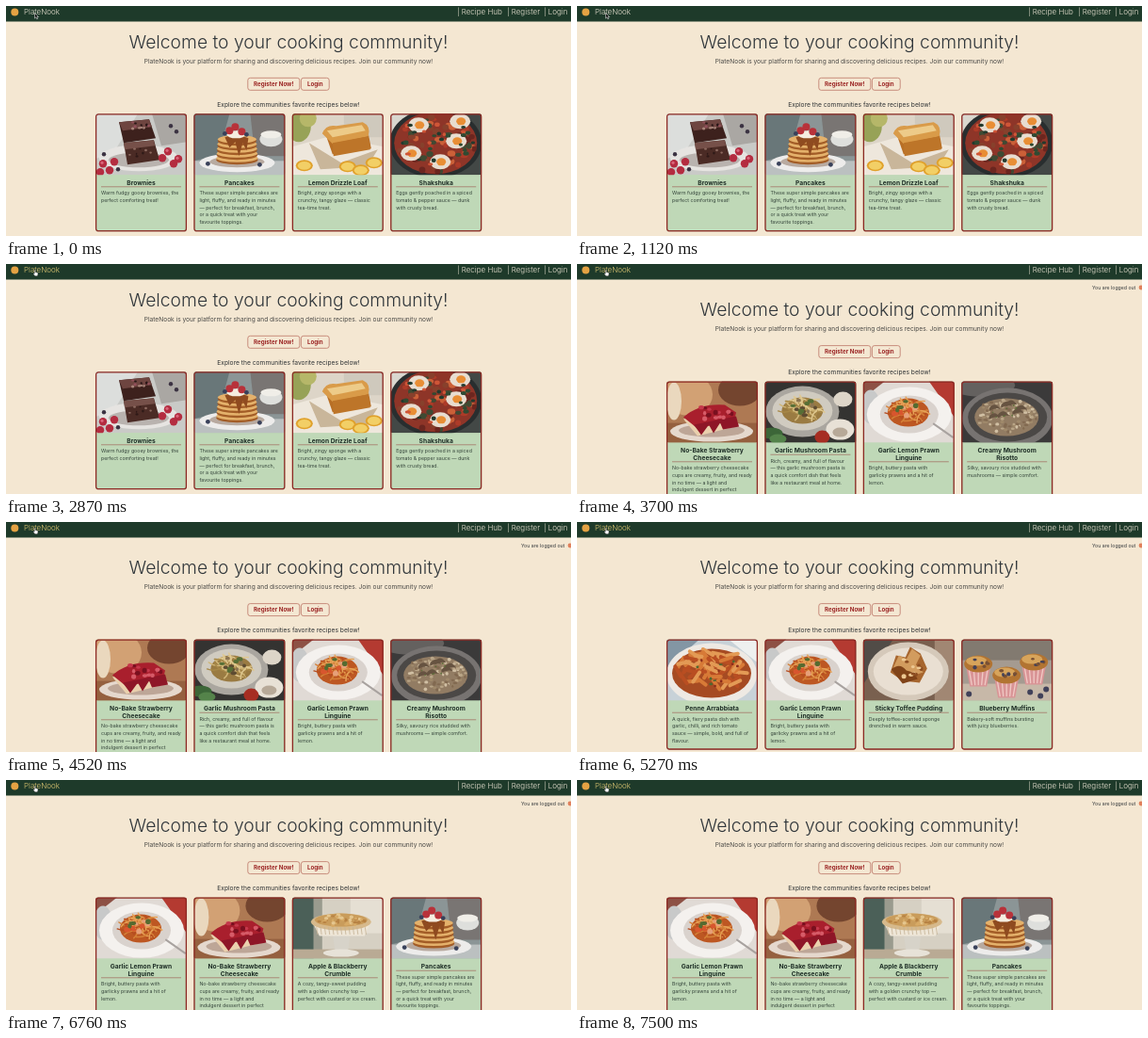
Animation of 600 by 244 pixels, one loop 7520 ms. Source, as an HTML page:

```html
<!DOCTYPE html>
<html lang="en">
<head>
<meta charset="utf-8">
<title>Cooking community</title>
<style>
  html, body { margin: 0; width: 100%; height: 100%; overflow: hidden; background: #f4e7d2; }
  svg { display: block; width: 600px; height: 244px; font-family: Inter, "Open Sans", sans-serif; }
</style>
</head>
<body>
<svg id="stage" viewBox="0 0 600 244"></svg>
<script>
const LOOP = 7520, HOVER = 2400, RELOADS = [0, 3450, 5030, 6560];
const BRAND = "PlateNook";

let seed = 1;
const rnd = (a, b) => {
  seed = (seed * 16807) % 2147483647;
  return a + (b - a) * seed / 2147483647;
};
const n = v => +v.toFixed(1);

// Shape helpers
const box = (x, y, w, h, fill, more = "") => `<rect x="${x}" y="${y}" width="${w}" height="${h}" fill="${fill}" ${more}/>`;
const oval = (x, y, rx, ry, fill) => `<ellipse cx="${n(x)}" cy="${n(y)}" rx="${n(rx)}" ry="${n(ry)}" fill="${fill}"/>`;
const path = (d, fill) => `<path d="${d}" fill="${fill}"/>`;
const line = (d, stroke, w) => `<path d="${d}" fill="none" stroke="${stroke}" stroke-width="${w}" stroke-linecap="round"/>`;
const text = (x, y, size, str, fill = "#33373a", more = "") =>
  `<text x="${x}" y="${y}" font-size="${size}" fill="${fill}" ${more}>${str}</text>`;
const MID = 'text-anchor="middle"', BOLD = 'font-weight="700"', THIN = 'font-weight="300"';

const repeat = (count, make) => Array.from({ length: count }, (_, i) => make(i)).join("");
const dots = (spots, r, fill) => spots.map(([x, y]) => oval(x, y, r, r, fill)).join("");

// Random point inside an ellipse
function inside(x, y, rx, ry) {
  const a = rnd(0, 6.283), d = Math.sqrt(rnd(0, 1));
  return [x + rx * d * Math.cos(a), y + ry * d * Math.sin(a)];
}
const scatter = (count, x, y, rx, ry, r, colors) => repeat(count, i => {
  const [px, py] = inside(x, y, rx, ry);
  return oval(px, py, r * rnd(.7, 1.4), r * rnd(.6, 1.1), colors[i % colors.length]);
});
const noodles = (count, x, y, rx, ry, len, w, colors) => repeat(count, i => {
  const [px, py] = inside(x, y, rx, ry), a = rnd(0, 6.283);
  const dx = len * Math.cos(a), dy = len * Math.sin(a) * .7;
  return line(`M${n(px - dx)} ${n(py - dy)}q${n(dx - dy * .6)} ${n(dy + dx * .5)} ${n(dx * 2)} ${n(dy * 2)}`, colors[i % colors.length], w);
});

// Each photo is a simplified scene, 97 by 65
const photos = {
  brownies: () => box(0, 0, 97, 65, "#c9cac7") + path("M0 0H45L20 40 0 48Z", "#dcdedc") + path("M60 0H97V30L70 34Z", "#aaa7a3") +
    oval(46, 47, 42, 14, "#e6e4e1") + oval(46, 49, 32, 8, "#b9b3af") +
    path("M30 31 62 28 68 49 34 54Z", "#4b2b25") + path("M30 31 62 28 63 34 31 38Z", "#765049") +
    path("M25 9 57 6 64 26 30 31Z", "#3d211d") + path("M25 9 57 6 60 14 29 18Z", "#6e4540") +
    scatter(14, 44, 12, 13, 4, 1.5, ["#2a1717", "#91505a", "#a9857b"]) + scatter(8, 48, 42, 13, 6, 1.2, ["#2e1917", "#8d6a60"]) +
    dots([[8, 53], [15, 60], [5, 62], [77, 40], [71, 47], [88, 48], [83, 53], [20, 51]], 4.2, "#b42c40") +
    dots([[7, 52], [76, 39], [87, 47]], 1.6, "#d9667a") + dots([[9, 43], [24, 59], [80, 13], [86, 19]], 2.2, "#3b3242"),

  pancakes: () => box(0, 0, 97, 65, "#8b9596") + path("M0 0H38L26 44 0 50Z", "#697779") + path("M60 0H97V45H65Z", "#797573") +
    box(0, 50, 97, 15, "#bbc0c0") + oval(82, 27, 12, 8, "#dedfdc") + oval(82, 22, 11, 4, "#f0eee8") +
    oval(46, 52, 40, 10, "#edeceb") + oval(46, 51, 29, 6, "#b8aaa0") +
    repeat(5, i => oval(46, 49 - i * 5, 22 - i * .4, 5, "#a35d27") + oval(46, 47 - i * 5, 22 - i * .4, 4.4, "#e4b16b")) +
    path("M33 25q12-5 25 1l-2 13-4-8-4 14-4-15-6 6Z", "#8f4b20") + oval(45, 22, 10, 4, "#f5ede0") +
    dots([[38, 18], [44, 14], [51, 19]], 4, "#b8323a") + dots([[33, 21], [56, 22], [15, 53], [70, 54]], 2.4, "#39415a"),

  loaf: () => box(0, 0, 97, 65, "#ddd5c8") + box(55, 0, 42, 25, "#cfc9bd") + oval(7, 13, 13, 17, "#97a257") + oval(17, 5, 9, 9, "#b6b769") +
    path("M0 35 40 24 97 35V65H0Z", "#eee7dc") + path("M18 31 52 52 91 38 80 56 30 59Z", "#c9b69a") +
    path("M35 20 43 43 84 37 80 16Z", "#b86f25") + path("M32 21Q36 11 47 13L75 9Q84 13 81 24L43 32Z", "#d99b49") +
    path("M37 18 74 12 78 18 43 25Z", "#edcb89") + path("M43 31 81 24 83 38 44 45Z", "#bd7529") +
    [[59, 56], [73, 60], [87, 52], [13, 55]].map(([x, y]) => oval(x, y, 9, 6, "#e0a12b") + oval(x, y, 7, 4.4, "#f2cf66")).join(""),

  shakshuka: () => box(0, 0, 97, 65, "#434846") + path("M0 0H28L0 25Z", "#d9d7cf") + oval(48, 31, 49, 37, "#292e2f") + oval(48, 31, 44, 33, "#8e3528") +
    scatter(70, 48, 31, 42, 31, 3.2, ["#ad3b28", "#cb6038", "#6b261f", "#3f4a33", "#87402c"]) +
    [[30, 12], [22, 42], [70, 29], [53, 51], [74, 8]].map(([x, y]) => oval(x, y, 11, 8, "#e8ddd0") + oval(x + 1, y, 5, 4, "#e88e35")).join("") +
    scatter(26, 48, 31, 40, 29, 2.2, ["#2f4a32", "#233a2d", "#cf5537"]),

  cheesecake: () => box(0, 0, 97, 65, "#ae7953") + oval(23, 14, 26, 22, "#d2a174") + oval(78, 9, 23, 17, "#74452f") +
    oval(8, 21, 8, 20, "#ead8be") + box(0, 44, 97, 21, "#95603f") + oval(48, 53, 44, 11, "#e5d8cd") + oval(48, 52, 35, 7, "#bda697") +
    path("M18 40 70 31 77 47 33 58Z", "#ead0ad") + path("M18 38Q35 23 62 25L74 33 72 41 33 50Z", "#a91f2d") +
    path("M29 46 74 37 77 48 60 51 57 44 50 55 45 46 37 57Z", "#8e1627") + scatter(18, 48, 33, 22, 7, 2.4, ["#c5384b", "#79101f", "#d65b68"]),

  mushroom: () => box(0, 0, 97, 65, "#343331") + oval(40, 32, 39, 27, "#aaa69f") + oval(40, 31, 32, 21, "#d0cbc0") + oval(40, 31, 22, 14, "#9a7b42") +
    noodles(42, 40, 30, 18, 11, 8, 1.5, ["#d0b678", "#a78848", "#e0c990"]) + scatter(14, 40, 29, 17, 10, 2.4, ["#5d4b31", "#566e35", "#8c7551"]) +
    oval(83, 19, 10, 8, "#ddd5c8") + oval(80, 51, 15, 11, "#e8e1d6") + oval(80, 54, 8, 5, "#b7a998") + oval(61, 59, 8, 7, "#a62d22") +
    oval(7, 55, 12, 6, "#3c6638") + oval(14, 61, 9, 5, "#54834a"),

  linguine: () => box(0, 0, 97, 65, "#e0dad5") + path("M0 0H23L0 18Z", "#8d5145") + path("M70 0H97V38Z", "#b43a31") + oval(8, 27, 10, 18, "#c8c9c9") +
    oval(49, 35, 45, 29, "#f4f1ee") + oval(49, 35, 31, 20, "#d9d2cd") + oval(48, 33, 22, 15, "#bd5722") +
    noodles(55, 48, 32, 17, 11, 8, 1.5, ["#d58138", "#b64d20", "#e6a257"]) + scatter(12, 48, 30, 17, 10, 2.7, ["#d8562e", "#e6a079", "#556b30"]) +
    line("M75 45 95 59", "#a8a29f", 2),

  risotto: () => box(0, 0, 97, 65, "#3b3a3a") + oval(21, 4, 36, 12, "#64615f") + oval(49, 39, 48, 32, "#777371") + oval(49, 38, 42, 26, "#4b4846") +
    oval(48, 38, 34, 20, "#927c63") + scatter(110, 48, 36, 32, 18, 1.7, ["#b9a587", "#9f896b", "#d0bfa3", "#826a51"]) +
    repeat(7, () => { const [x, y] = inside(49, 31, 22, 9); return path(`M${n(x - 6)} ${n(y)}q6-8 12 1q-6-2-12 2Z`, "#665341"); }) +
    scatter(8, 48, 32, 20, 10, .9, ["#596d38"]),

  penne: () => box(0, 0, 97, 65, "#c8d2d8") + path("M0 0H35L0 31Z", "#8396a4") + path("M66 0H97V25Z", "#eef0ef") + oval(48, 37, 48, 33, "#eee9e3") + oval(48, 36, 42, 26, "#a64b23") +
    repeat(60, i => {
      const [x, y] = inside(48, 33, 36, 22), a = rnd(-1.1, 1.1), dx = n(6 * Math.cos(a)), dy = n(6 * Math.sin(a));
      return line(`M${n(x - dx)} ${n(y - dy)}l${n(2 * dx)} ${n(2 * dy)}`, ["#d77a37", "#b94e22", "#e39a55"][i % 3], 4);
    }) + scatter(12, 48, 32, 30, 18, 1.5, ["#4f6930", "#8c2d1b"]),

  toffee: () => box(0, 0, 97, 65, "#79604f") + path("M0 0H32L0 48Z", "#514c47") + box(76, 0, 21, 65, "#a18773") + oval(48, 34, 43, 31, "#d5c9ba") + oval(48, 34, 37, 25, "#e9dfd2") +
    path("M29 35 35 17 45 19 50 8 61 15 68 31 60 46 42 44Z", "#a7662f") + path("M32 30 38 17 46 21 52 10 61 17 56 27 64 35 51 39Z", "#d29c5e") +
    path("M30 32q9-8 16 1q8 1 12 9l-16 5Z", "#804318") + scatter(12, 48, 29, 14, 11, 2.3, ["#edc892", "#8b4c20"]),

  muffins: () => box(0, 0, 97, 65, "#a59b91") + box(0, 0, 97, 22, "#827a70") + box(0, 47, 97, 18, "#c7b8a8") +
    [[18, 29], [77, 27], [48, 41]].map(([x, y]) =>
      path(`M${x - 13} ${y}h26l-4 21h-18Z`, "#d99496") + repeat(5, i => line(`M${x - 10 + i * 5} ${y + 2}L${x - 7 + i * 3.5} ${y + 19}`, "#f0c9c5", 1.3)) +
      oval(x, y - 3, 15, 9, "#b27432") + oval(x - 2, y - 6, 11, 5, "#d7a45b") + scatter(6, x, y - 4, 11, 5, 2, ["#424058", "#795033"])).join("") +
    dots([[8, 58], [73, 56], [84, 60], [90, 53]], 3, "#414159"),

  crumble: () => box(0, 0, 97, 65, "#d6d0c3") + box(0, 0, 23, 65, "#4b6058") + box(23, 0, 9, 65, "#9a9b8e") + box(62, 0, 35, 38, "#e5dfd3") + box(0, 55, 97, 10, "#b9aa94") +
    path("M43 39H62L59 58H46Z", "#d7d3c9") + oval(52, 59, 19, 4, "#e7e2d8") + path("M21 25H84L77 41H29Z", "#eee6d7") + oval(52, 26, 32, 9, "#d6b98c") + oval(52, 24, 28, 7, "#c99c5b") +
    scatter(45, 52, 24, 26, 6, 1.8, ["#e5c68e", "#b78243", "#d7aa66"]) + repeat(13, i => line(`M${26 + i * 4.3} 32l1 7`, "#c4b195", .8))
};

// photo: [title, description], lines split by |
const recipes = {
  brownies: ["Brownies", "Warm fudgy gooey brownies, the|perfect comforting treat!"],
  pancakes: ["Pancakes", "These super simple pancakes are|light, fluffy, and ready in minutes|— perfect for breakfast, brunch,|or a quick treat with your|favourite toppings."],
  loaf: ["Lemon Drizzle Loaf", "Bright, zingy sponge with a|crunchy, tangy glaze — classic|tea-time treat."],
  shakshuka: ["Shakshuka", "Eggs gently poached in a spiced|tomato &amp; pepper sauce — dunk|with crusty bread."],
  cheesecake: ["No-Bake Strawberry|Cheesecake", "No-bake strawberry cheesecake|cups are creamy, fruity, and ready|in no time — a light and|indulgent dessert in perfect"],
  mushroom: ["Garlic Mushroom Pasta", "Rich, creamy, and full of flavour|— this garlic mushroom pasta is|a quick comfort dish that feels|like a restaurant meal at home."],
  linguine: ["Garlic Lemon Prawn|Linguine", "Bright, buttery pasta with|garlicky prawns and a hit of|lemon."],
  risotto: ["Creamy Mushroom|Risotto", "Silky, savoury rice studded with|mushrooms — simple comfort."],
  penne: ["Penne Arrabbiata", "A quick, fiery pasta dish with|garlic, chilli, and rich tomato|sauce — simple, bold, and full of|flavour."],
  toffee: ["Sticky Toffee Pudding", "Deeply toffee-scented sponge|drenched in warm sauce."],
  muffins: ["Blueberry Muffins", "Bakery-soft muffins bursting|with juicy blueberries."],
  crumble: ["Apple &amp; Blackberry|Crumble", "A cozy, tangy-sweet pudding|with a golden crunchy top —|perfect with custard or ice cream."]
};

function card(key, i, top, height) {
  const [title, about] = recipes[key].map(s => s.split("|"));
  const drop = (title.length - 1) * 7.7;
  seed = 77;
  return `<g transform="translate(${95 + i * 104.4} ${top})">` +
    box(0, 0, 97, height, "#bfd8b7", 'rx="2.5"') +
    `<g clip-path="url(#photo)"><g filter="url(#soft)">${photos[key]()}</g></g>` +
    title.map((s, k) => text(48.5, 75.3 + k * 7.7, 6.7, s, "#1d2d25", MID + BOLD)).join("") +
    box(6, 77.2 + drop, 85, .7, "#a0695b") +
    about.map((s, k) => text(6, 86 + drop + k * 7.7, 5.25, s, "#34443a")).join("") +
    box(.6, .6, 95.8, height - 1.2, "none", 'rx="2.5" stroke="#8d2823" stroke-width="1.3"') + "</g>";
}

const button = (x, w, label) =>
  box(x, 76.3, w, 13, "none", 'rx="2.5" stroke="#bd7767" stroke-width=".8"') + text(x + w / 2, 85.1, 6.2, label, "#9b2423", MID + BOLD);

function page(keys, shift, height) {
  return `<g class="page"><g transform="translate(0 ${shift})">` +
    text(300, 45, 19.3, "Welcome to your cooking community!", "#30363a", MID + THIN) +
    text(300, 60.8, 6.6, BRAND + " is your platform for sharing and discovering delicious recipes. Join our community now!", "#4a4946", MID) +
    button(256.8, 55, "Register Now!") + button(313.4, 29.8, "Login") +
    text(300, 106.8, 6.7, "Explore the communities favorite recipes below!", "#2e3234", MID) + "</g>" +
    keys.split(" ").map((key, i) => card(key, i, 114.3 + shift, height)).join("") +
    (shift ? text(547, 27, 5.2, "You are logged out") + oval(599, 25, 2.4, 2.4, "#e0805c") : "") + "</g>";
}

const stage = document.getElementById("stage");
stage.innerHTML = `<defs>
  <clipPath id="photo"><rect width="97" height="65" rx="2.5"/></clipPath>
  <filter id="soft" x="0" y="0" width="1" height="1"><feGaussianBlur stdDeviation=".5"/></filter></defs>` +
  box(0, 0, 600, 244, "#f4e7d2") +
  page("brownies pancakes loaf shakshuka", 0, 125) +
  page("cheesecake mushroom linguine risotto", 10.3, 135) +
  page("penne linguine toffee muffins", 10.3, 117) +
  page("linguine cheesecake crumble pancakes", 10.3, 135) +
  box(0, 0, 600, 16.5, "#1e3a2a") + oval(9.3, 6.6, 4, 4, "#e5a243") +
  text(19, 9.4, 8, BRAND, "#e9e2d2", 'id="brand"' + THIN) +
  [[479, "Recipe Hub"], [532, "Register"], [571, "Login"]].map(([x, s]) => text(x, 9.4, 8, "| " + s, "#ece5d5", THIN)).join("") +
  `<path id="arrow" d="M30.5 7.5v5.6l1.3-1.2 1 2 .9-.4-.9-2h1.7Z" fill="#111" stroke="#fff" stroke-width=".5"/>
   <path id="hand" d="M30.2 6.5q.7-.6 1.1.2v2l2.3.6q.6.3.4 1.2l-.6 2.3h-2.6l-1.9-2.4q.2-.8 1.3-.1Z" fill="#fff" stroke="#222" stroke-width=".4"/>`;

const pages = [...stage.querySelectorAll(".page")];
const [brand, arrow, hand] = ["brand", "arrow", "hand"].map(id => document.getElementById(id));
const show = (el, on) => el.setAttribute("visibility", on ? "visible" : "hidden");

function draw(now) {
  const t = now % LOOP, hover = t >= HOVER;
  const current = RELOADS.filter(start => t >= start).length - 1;
  pages.forEach((p, i) => show(p, i === current));
  brand.setAttribute("fill", hover ? "#dfc873" : "#e9e2d2");
  show(arrow, !hover);
  show(hand, hover);
}
const start = performance.now();
function tick() {
  draw(performance.now() - start);
  requestAnimationFrame(tick);
}
tick();
</script>
</body>
</html>
```
